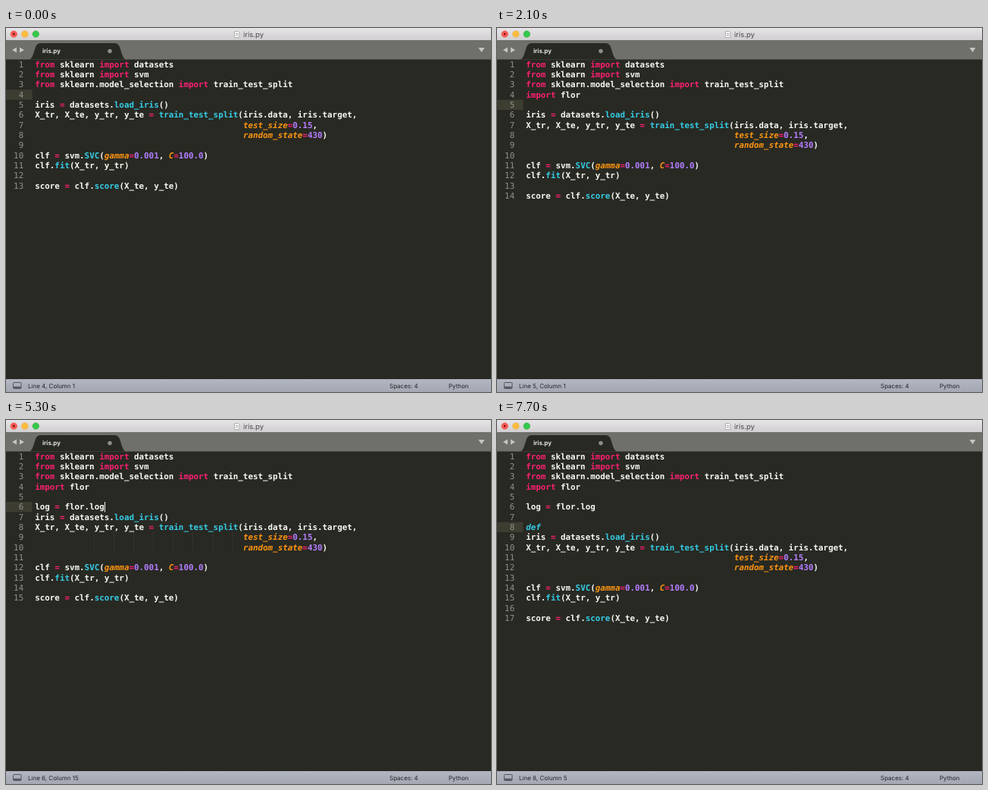
An HTML page that plays this animation: 640 px wide and 480 px high, repeating every 8000 ms.

```html
<!DOCTYPE html>
<html lang="en">
<head>
<meta charset="utf-8">
<title>iris.py</title>
<style>
  html, body { margin: 0; width: 100%; height: 100%; overflow: hidden; background: #282923; }
  svg { display: block; width: 640px; height: 480px; }
  text { text-rendering: geometricPrecision; }
  .ui { font: 8px Inter, "Open Sans", sans-serif; fill: #24262b; }
  #code { font: bold 10.864px "DejaVu Sans Mono", "Noto Sans Mono", monospace; fill: #f8f8f2; }
  #code .num { fill: #90918b; font-weight: normal; text-anchor: end; }
  .keyword { fill: #fb1f70; }
  .storage { fill: #35cde6; font-style: italic; }
  .call { fill: #35cde6; }
  .param { fill: #fd9510; font-style: italic; }
  .number { fill: #b37dff; }
  .guide { stroke: #3b3c34; stroke-dasharray: 1 1; }
</style>
</head>
<body>
<svg viewBox="0 0 640 480">
  <defs>
    <linearGradient id="titleFill" x2="0" y2="1">
      <stop stop-color="#e6e4e6"/><stop offset="1" stop-color="#d1cfd1"/>
    </linearGradient>
    <linearGradient id="statusFill" x2="0" y2="1">
      <stop stop-color="#b2b6c1"/><stop offset="1" stop-color="#a4a8b3"/>
    </linearGradient>
  </defs>
  <rect width="640" height="480" fill="#282923"/>

  <!-- Title bar -->
  <rect width="640" height="16" fill="url(#titleFill)"/>
  <g stroke-width=".5">
    <circle cx="10.3" cy="8" r="4.3" fill="#fc5b57" stroke="#df4744"/>
    <circle cx="24.8" cy="8" r="4.3" fill="#fdbc40" stroke="#dea034"/>
    <circle cx="39.3" cy="8" r="4.3" fill="#34c84a" stroke="#27aa35"/>
  </g>
  <circle cx="10.3" cy="8" r="1.4" fill="#7d1412"/>
  <path d="M301.5 4.5h5l1.5 1.5v6.5h-6.5z" fill="#f8f8f8" stroke="#999" stroke-width=".7"/>
  <path d="M303 7.5h3.5M303 9.5h3.5" stroke="#999" stroke-width=".8"/>
  <text class="ui" x="313" y="11.5" style="font-size:9.5px;fill:#444">iris.py</text>

  <!-- Tab bar -->
  <rect y="16" width="640" height="25.5" fill="#6e7069"/>
  <path d="M31 41.5C35 40 36 34 38.5 26.5Q40.5 20 45 20H144Q148.500 20 150.500 26.500C153 34 154 40 158 41.500z" fill="#282923"/>
  <path d="M14 25.500v7l-6-3.500zM18 25.500v7l6-3.500zM623.500 26h8l-4 6z" fill="#c4c5c1"/>
  <text class="ui" x="48" y="33" style="font-weight:600;fill:#f8f8f8">iris.py</text>
  <circle cx="137" cy="30.500" r="2.700" fill="#8e8f88"/>

  <g id="code"></g>

  <!-- Status bar -->
  <rect y="463" width="640" height="17" fill="url(#statusFill)"/>
  <rect x="9.500" y="467.500" width="10.500" height="8" rx="1" fill="none" stroke="#50535b"/>
  <path d="M10 473.800h9.500" stroke="#50535b" stroke-width="2"/>
  <g class="ui">
    <text id="position" x="29" y="474.500"></text>
    <text x="506" y="474.500">Spaces: 4</text>
    <text x="584" y="474.500">Python</text>
  </g>
</svg>

<script>
const DURATION = 8000;
const LEFT = 38.2, TOP = 41.4, CHAR = 6.54, ROW = 13.32;
const INDENT = 42;

const HEAD = [
  'from sklearn import datasets',
  'from sklearn import svm',
  'from sklearn.model_selection import train_test_split',
];
const TAIL = [
  'iris = datasets.load_iris()',
  'X_tr, X_te, y_tr, y_te = train_test_split(iris.data, iris.target,',
  ' '.repeat(INDENT) + 'test_size=0.15,',
  ' '.repeat(INDENT) + 'random_state=430)',
  '',
  'clf = svm.SVC(gamma=0.001, C=100.0)',
  'clf.fit(X_tr, y_tr)',
  '',
  'score = clf.score(X_te, y_te)',
];

const IMPORT = 'import flor';
const LOG = IMPORT + '\n\nlog = flor.log';
const STEPS = [
  { at: 0, typed: '' },
  { at: 500, typed: 'import', caret: true },
  { at: 1300, typed: IMPORT, caret: true, guides: true },
  { at: 2100, typed: IMPORT + '\n' },
  { at: 2900, typed: IMPORT + '\n\n', guides: true, fold: true },
  { at: 3700, typed: IMPORT + '\n\nlog', caret: true, guides: true },
  { at: 4500, typed: IMPORT + '\n\nlog = flor', caret: true, guides: true },
  { at: 5300, typed: LOG, caret: true, guides: true },
  { at: 6100, typed: LOG + '\n' },
  { at: 6900, typed: LOG + '\n\n' },
  { at: 7700, typed: LOG + '\n\ndef ' },
];

const TOKEN = new RegExp([
  '(?<keyword>\\b(?:from|import)\\b|=)',
  '(?<storage>\\bdef\\b)',
  '(?<call>\\w+(?=\\())',
  '(?<param>\\w+(?==))',
  '(?<number>\\b\\d[\\d.]*)',
  '(?<plain>\\w+|[^\\w\\s=]+)',
].join('|'), 'g');

const code = document.getElementById('code');
const position = document.getElementById('position');
const rowTop = row => TOP + row * ROW;
const colX = col => LEFT + col * CHAR;

function drawLine(line, row) {
  const y = rowTop(row) + 10.4;
  const tokens = [...line.matchAll(TOKEN)].map(match => {
    const kind = Object.keys(match.groups).find(name => match.groups[name]);
    return `<tspan class="${kind}" x="${colX(match.index)}">${match[0]}</tspan>`;
  });
  return `<text class="num" x="23.2" y="${y}">${row + 1}</text>` +
    `<text y="${y}">${tokens.join('')}</text>`;
}

function drawGuides(row) {
  let path = '';
  for (let col = 12; col < INDENT; col += 4) {
    path += `M${Math.round(colX(col)) - 0.5} ${rowTop(row)}v${2 * ROW}`;
  }
  return `<path class="guide" d="${path}"/>`;
}

function render({ typed, caret, guides, fold }) {
  const lines = [...HEAD, ...typed.split('\n')];
  const row = lines.length - 1;
  const col = lines[row].length;
  const y = rowTop(row);

  let markup = `<rect y="${y}" width="34.5" height="${ROW}" fill="#3e3d32"/>`;
  if (guides) markup += drawGuides(row + 3);
  markup += [...lines, ...TAIL].map(drawLine).join('');
  if (caret) {
    markup += `<rect x="${Math.round(colX(col))}" y="${y}" width="1" height="${ROW}"/>`;
  }
  if (fold) {
    markup += `<path d="M27 ${rowTop(row + 2) + 4.2}h7l-3.5 5.500z" fill="#90918b"/>`;
  }
  code.innerHTML = markup;
  position.textContent = `Line ${row + 1}, Column ${col + 1}`;
}

let shown;
function tick() {
  const time = performance.now() % DURATION;
  const step = STEPS.findLast(({ at }) => at <= time);
  if (step !== shown) render(shown = step);
  requestAnimationFrame(tick);
}
tick();
</script>
</body>
</html>
```
